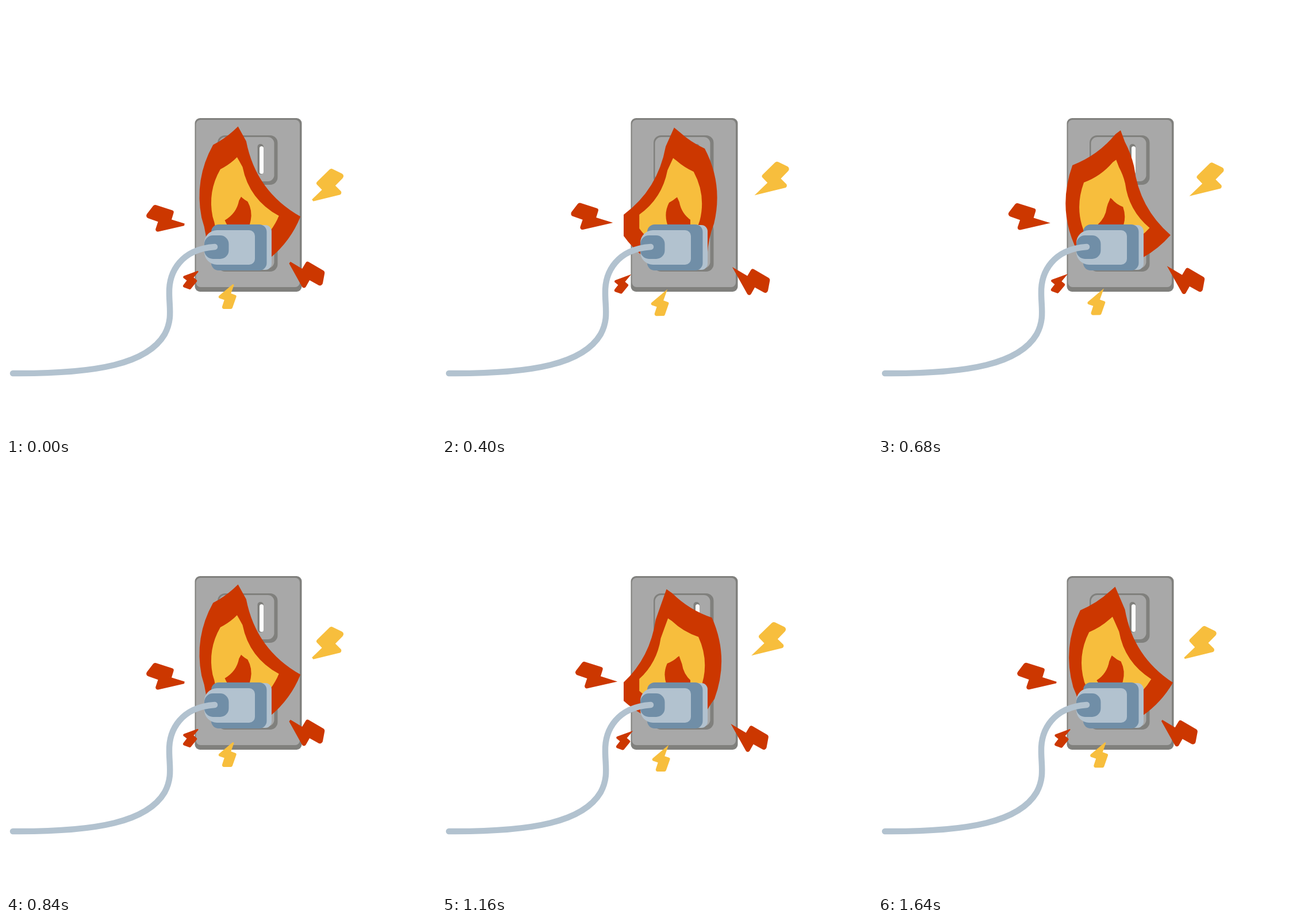
These frames come from a looping animation (748x748 px, 1680 ms). An HTML page with a canvas:

```html
<!DOCTYPE html>
<html lang="en">
<head>
<meta charset="utf-8">
<title>Burning socket</title>
<style>
html, body { margin: 0; width: 100%; height: 100%; overflow: hidden; background: #fff; }
canvas { display: block; width: 748px; height: 748px; }
</style>
</head>
<body>
<canvas width="748" height="748"></canvas>
<script>
const ctx = document.querySelector('canvas').getContext('2d');
const STEP = 40, POSE = 210, AXIS = 813;
const RED = '#cc3700', YELLOW = '#f7be3d', GREY = '#a8a8a8', DARK = '#80807d';
const PALE = '#b2c2cf', BLUE = '#708ea7';

// Eased position between the key points on either side of a pose number.
function ease(keys, pose) {
  const i = Math.floor(pose), u = pose - i, s = u * u * (3 - 2 * u);
  const a = keys[i % keys.length], b = keys[(i + 1) % keys.length];
  return a.map((v, j) => v + (b[j] - v) * s);
}

// Ripples climb the flame's edge, one every four poses, and melt into the tip.
const tip = [[390, 218], [422, 203], [422, 218], [390, 203]];
const notch = [[474, 410], [472, 337], [442, 272], [400, 208], [400, 225], [430, 211]];
const bulge = [[455, 440], [470, 425], [514, 395], [511, 345], [470, 268], [440, 222], [428, 238]];
const foot = [460, 438];

// Control point that bows a segment outward (1), inward (-1) or not at all (0).
function bowed([x1, y1], [x2, y2], side) {
  const dx = x2 - x1, dy = y2 - y1, k = side * Math.hypot(dx, dy) / 700;
  return [(x1 + x2) / 2 + dy * k, (y1 + y2) / 2 - dx * k];
}

// Alternating control and end points from the tip down to the foot.
function flameEdge(top, pose) {
  const pts = [];
  let last = top, side = 0;
  const add = (point, nextSide) => {
    pts.push(bowed(last, point, side), point);
    last = point;
    side = nextSide;
  };
  for (const age of [pose % 4 + 4, pose % 4]) {
    if (age < 5) add(ease(notch, age), -1);
    if (age < 6) add(ease(bulge, age), 1);
  }
  add(foot, 0);
  return pts;
}

function flamePath(pose) {
  const flip = ([x, y]) => [AXIS - x, y];
  const top = ease(tip, pose);
  const left = flameEdge(flip(top), pose + 2).map(flip);
  const pts = [...left.reverse(), top, ...flameEdge(top, pose)];
  const path = new Path2D();
  path.moveTo(...pts[0]);
  for (let i = 1; i < pts.length; i += 2) path.quadraticCurveTo(...pts[i], ...pts[i + 1]);
  path.closePath();
  return path;
}

function clipTo(x, y, w, h) {
  ctx.beginPath();
  ctx.rect(x, y, w, h);
  ctx.clip();
}

function drawFlame(pose) {
  const path = flamePath(pose);
  const layer = (color, sx, sy, dx, dy) => {
    ctx.save();
    ctx.transform(sx, 0, 0, sy, dx, dy);
    clipTo(316, 190, 230, 280);
    ctx.fillStyle = color;
    ctx.fill(path);
    ctx.restore();
  };
  layer(RED, 1, 1, 0, 0);
  layer(YELLOW, .67, .65, 131.5, 127);
  layer(RED, -.262, .26, 514.8, 277.4);
}

// One bolt with its point at the origin, lying along the x axis.
const boltPath = new Path2D();
boltPath.moveTo(0, 0);
boltPath.lineTo(31, -4);
boltPath.arcTo(29, -20, 66, -25, 4);
boltPath.arcTo(66, -25, 79, 0, 5);
boltPath.arcTo(79, 0, 54, 4, 5);
boltPath.lineTo(54, 4);
boltPath.arcTo(57, 24, 0, 0, 4);
boltPath.closePath();

// (x, y) is the point when furthest out; mid is how far out it rests on the way.
const bolts = [
  { color: RED, x: 297, y: 377, angle: -170, size: .98, mid: .13, flip: -1 },
  { color: RED, x: 329, y: 467, angle: 137, size: .54, mid: .13, flip: 1 },
  { color: YELLOW, x: 392, y: 493, angle: 117, size: .66, mid: .25, flip: 1 },
  { color: YELLOW, x: 544, y: 329, angle: -36.6, size: 1, mid: .25, flip: 1 },
  { color: RED, x: 505, y: 454, angle: 38, size: .98, mid: .65, flip: 1 },
];

function drawBolt({ color, x, y, angle, size, mid, flip }, pose) {
  const [out] = ease([[0], [mid], [1], [1]], pose);
  ctx.save();
  ctx.translate(x, y);
  ctx.rotate(angle * Math.PI / 180);
  ctx.scale(size, size * flip);
  clipTo(-14, -50, 120, 100);
  ctx.translate(21 * (out - 1), 0);
  ctx.fillStyle = color;
  ctx.fill(boltPath);
  ctx.restore();
}

function box(color, x1, y1, x2, y2, r) {
  ctx.fillStyle = color;
  ctx.beginPath();
  ctx.roundRect(x1, y1, x2 - x1, y2 - y1, r);
  ctx.fill();
}

function drawPlate() {
  box(DARK, 328.5, 195, 514.5, 497, 9);
  box(GREY, 330.5, 198, 511, 489, 8);
  for (const y of [0, 151]) {
    box(DARK, 368, 225 + y, 472.5, 311 + y, 13);
    box(GREY, 370.5, 228 + y, 466.5, 305 + y, 11);
    for (const x of [394, 437.5]) {
      box(DARK, x, 240 + y, x + 10.5, 293 + y, 5);
      box('#fff', x + 3.5, 244 + y, x + 10.5, 292 + y, 3.5);
    }
  }
}

const cord = new Path2D('M363 419C305 423 283 462 284 500C284 525 290 545 276 571C246 622 160 640 12 639');

function drawPlug() {
  box(PALE, 420, 381, 462, 459, 11);
  box(BLUE, 357, 380, 453.5, 460, 13);
  box(PALE, 345, 390, 433, 450, [22, 10, 10, 22]);
  box(BLUE, 345, 399, 387.5, 440, 15);
  ctx.strokeStyle = PALE;
  ctx.lineWidth = 10.5;
  ctx.lineCap = 'round';
  ctx.stroke(cord);
}

function draw() {
  const pose = Math.floor(performance.now() / STEP) * STEP / POSE % 4;
  ctx.fillStyle = '#fff';
  ctx.fillRect(0, 0, 748, 748);
  drawPlate();
  drawFlame((pose + 2.55) % 4);
  for (const bolt of bolts) drawBolt(bolt, pose);
  drawPlug();
  requestAnimationFrame(draw);
}
draw();
</script>
</body>
</html>
```
